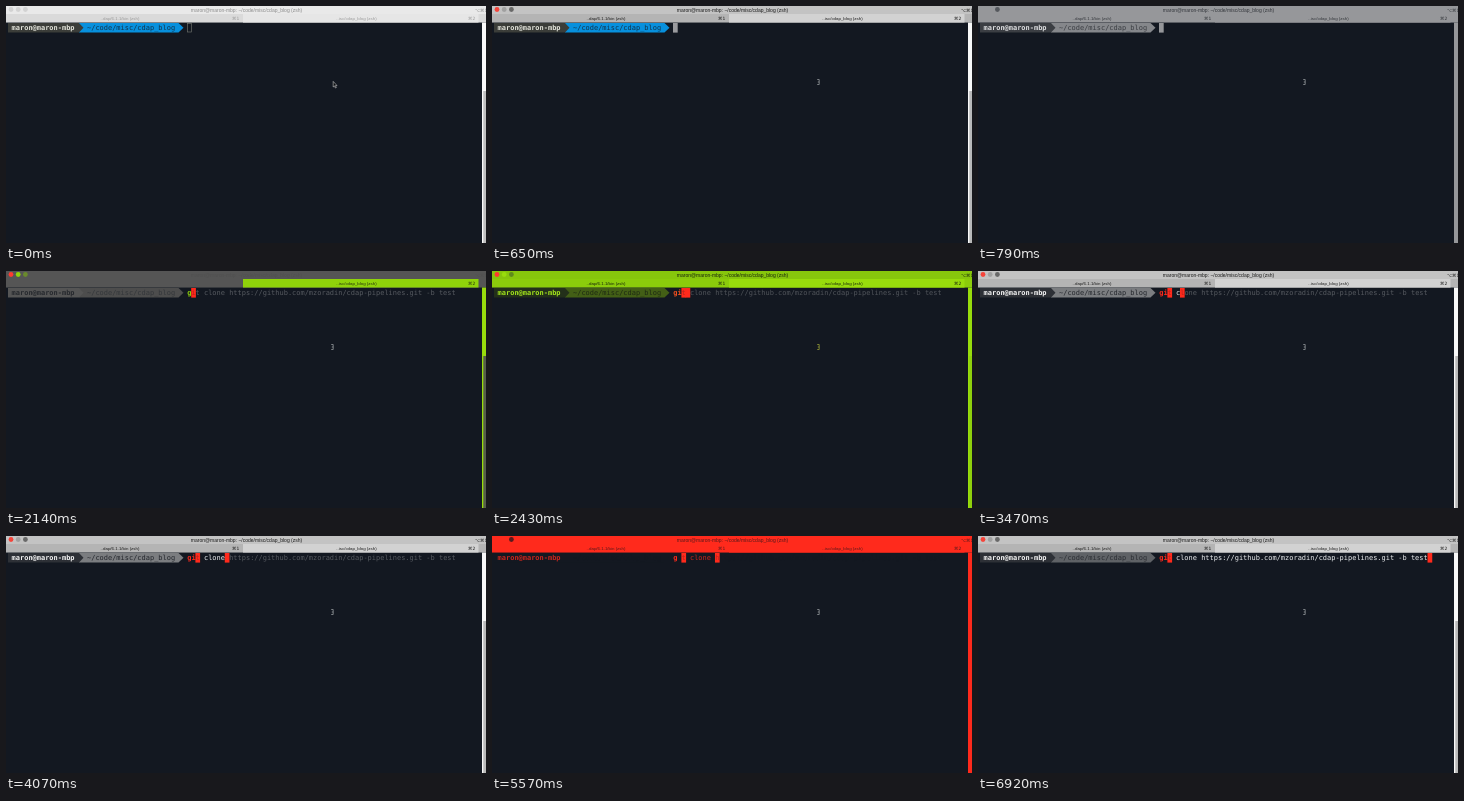
Recreate the animation shown at these times as an HTML page. Size 480x237 px, loop 8 s.

```html
<!DOCTYPE html>
<html lang="en">
<head>
<meta charset="utf-8">
<title>Terminal</title>
<style>
  html, body { margin: 0; width: 100%; height: 100%; overflow: hidden; background: #131821; }
  svg { display: block; width: 100vw; height: 100vh; }
  text { white-space: pre; font: 5px "Liberation Sans", Arial, sans-serif; }
  .mono { font: 6.97px "DejaVu Sans Mono", monospace; }
  .bold { font-weight: 700; }
  .key { font: 4.4px "DejaVu Sans", sans-serif; }
  .tab { font-size: 4.4px; }
</style>
</head>
<body>
<svg id="stage" viewBox="0 0 480 237" preserveAspectRatio="none"></svg>
<script>
const LOOP = 8000, BG = '#131821', RED = '#ff2a1c', CELL = 4.196, LEFT = 181.2, TOP = 16.55;
const USER = 'maron@maron-mbp', PATH = '~/code/misc/cdap_blog';
const COMMAND = 'git clone https://github.com/mzoradin/cdap-pipelines.git -b test';

// bars: title, left tab, right tab; scroll: track and thumb
const grey = {
  bars: ['#c3c3c3', '#b4b4b4', '#d2d2d2'], ink: '#1a1a1a', tabInk: '#1a1a1a',
  lights: ['#f5443a', '#a0a0a0', '#686868'], scroll: ['#f8f8f8', '#b9b9b9'],
  host: '#2d3036', hostInk: '#f4f4f4', dir: '#7b7d80', dirInk: '#24272c',
  word: RED, typed: '#eef0f2', hint: '#565a60', cursor: RED
};
const idle = {
  ...grey, bars: ['#e9e9e9', '#dadada', '#e6e6e6'], ink: '#8c8c8c', tabInk: '#9b9b9b',
  lights: ['#d2d2d2', '#d2d2d2', '#d2d2d2'], scroll: ['#fafafa', '#bebebe'],
  host: '#3b3d39', hostInk: '#e2e3da', dir: '#0790dd', dirInk: '#12344c', cursor: '#777b72'
};
const focus = { ...idle, bars: grey.bars, ink: grey.ink, tabInk: grey.tabInk,
  lights: grey.lights, scroll: grey.scroll, cursor: '#9a9b9e' };
const ash = {
  ...grey, bars: ['#96979a', '#96979a', '#96979a'], ink: '#33363b', tabInk: '#33363b',
  lights: ['none', 'none', '#55585d'], scroll: ['#96979a', '#96979a'],
  host: '#3b3e43', hostInk: '#dedfe1', dir: '#85878b', dirInk: '#3b3e43', cursor: '#96979a'
};
const half = {
  ...grey, bars: ['#555555', '#555555', '#8fd30a'], ink: '#505050', tabInk: '#26300f',
  lights: ['#ff3a30', '#8fd30a', '#6a8a2c'], scroll: ['#98dc0c', '#565c4c'],
  host: '#555555', hostInk: '#26292e', dir: '#4d4d4d', dirInk: '#34373b',
  word: '#8fd30a', hideTab: true
};
const green = {
  ...grey, bars: ['#87c60c', '#8bcc0b', '#98dc0c'], ink: '#17220c', tabInk: '#17220c',
  lights: ['#ff3a30', '#98dc0c', '#5f8a1c'], scroll: ['#98dc0c', '#8fd00c'],
  host: '#23301a', hostInk: '#a2e41c', dir: '#435f16', dirInk: '#1e2a13',
  word: '#f3501f', hint: '#50545a', pointer: '#a5ac38'
};
const red = {
  ...grey, bars: [RED, RED, RED], ink: '#571a1c', tabInk: '#571a1c',
  lights: ['none', 'none', '#571a1c'], scroll: [RED, RED],
  host: BG, hostInk: '#c8261e', dir: BG, dirInk: BG, typed: '#c8261e', hint: BG, gap: true
};
const late = { ...grey, dir: '#5f6266', dirInk: '#2b2e33' };

// start, look, characters typed
const steps = [
  [0, idle, 0], [500, idle, 0], [650, focus, 0], [790, ash, 0], [2140, half, 1],
  [2280, green, 2], [2430, green, 3], [2570, grey, 4], [3470, grey, 5], [3620, grey, 6],
  [3770, grey, 7], [4070, grey, 9], [5570, red, 10], [6920, late, COMMAND.length]
];

const rect = (x, y, w, h, fill, extra = '') =>
  `<rect x="${x}" y="${y}" width="${w}" height="${h}" fill="${fill}" ${extra}/>`;
const text = (x, y, s, fill, cls = '', anchor = 'start') =>
  `<text x="${x}" y="${y}" fill="${fill}" class="${cls}" text-anchor="${anchor}">${s}</text>`;
const shape = (d, fill, extra = '') => `<path d="${d}" fill="${fill}" ${extra}/>`;
const cellX = n => LEFT + n * CELL;
const mono = (n, s, fill, weight = '') => text(cellX(n), 24.3, s, fill, 'mono ' + weight);
const block = (n, fill) => rect(cellX(n) - .2, 17, 4.7, 9.6, fill);

function windowBars(k) {
  let out = rect(0, 0, 480, 8, k.bars[0]) + rect(0, 8, 480, TOP - 8, k.bars[1])
    + rect(237, 8, 235.5, TOP - 8, k.bars[2]);
  k.lights.forEach((c, i) => out += `<circle cx="${5 + 7.2 * i}" cy="3.5" r="2.4" fill="${c}"/>`);
  out += text(240.5, 5.5, `${USER}: ${PATH} (zsh)`, k.ink, '', 'middle')
    + text(469, 5.5, '⌥⌘1', k.ink, 'key');
  if (!k.hideTab) {
    out += text(114, 13.8, '..dap/6.1.1/bin (zsh)', k.tabInk, 'tab', 'middle')
      + text(226, 13.8, '⌘1', k.tabInk, 'key');
  }
  return out + text(350.5, 13.8, '..isc/cdap_blog (zsh)', k.tabInk, 'tab', 'middle')
    + text(462, 13.8, '⌘2', k.tabInk, 'key')
    + rect(476, TOP, 4, 237 - TOP, k.scroll[0]) + rect(477.3, 85, 2.7, 152, k.scroll[1]);
}

function prompt(k) {
  return shape('M73 17H172.5L177.5 21.8L172.5 26.6H73Z', k.dir)
    + shape('M2 17H73L77.5 21.8L73 26.6H2Z', k.host)
    + text(5.6, 24.3, USER, k.hostInk, 'mono bold') + text(81, 24.3, PATH, k.dirInk, 'mono');
}

function commandLine(k, n) {
  if (k === idle) {
    return rect(181.6, 17.6, 4, 8.4, 'none', `stroke="${k.cursor}" stroke-width=".6"`);
  }
  if (!n) return block(0, k.cursor);
  const word = k.gap ? 'g' : COMMAND.slice(0, Math.min(n, 2));
  let out = mono(0, word, k.word, 'bold') + mono(3, COMMAND.slice(3, n), k.typed)
    + mono(n + 1, COMMAND.slice(n + 1), k.hint);
  if (n > 2) out += block(2, k.cursor) + mono(2, 't', '#b8241d');
  return out + block(n, k.cursor) + mono(n, COMMAND[n] || '', '#b8241d');
}

function pointer(k, t) {
  return t < 500
    ? shape('M327.2 75.4V81L328.5 79.9L329.4 82L330.3 81.6L329.4 79.6H331Z', '#0b0d10',
        'stroke="#e8e8e8" stroke-width=".5"')
    : shape('M325.2 73.5H327.2V78.5H325.2M325.8 76H327.2', 'none',
        `stroke="${k.pointer || '#a3a6aa'}" stroke-width=".7"`);
}

const stage = document.getElementById('stage');
let shown;

function frame(now) {
  const t = now % LOOP;
  const step = steps.findLast(s => s[0] <= t);
  if (step !== shown) {
    shown = step;
    const [start, look, n] = step;
    stage.innerHTML = rect(0, 0, 480, 237, BG) + windowBars(look) + prompt(look)
      + commandLine(look, n) + pointer(look, start);
  }
  requestAnimationFrame(frame);
}
frame(0);
</script>
</body>
</html>
```
